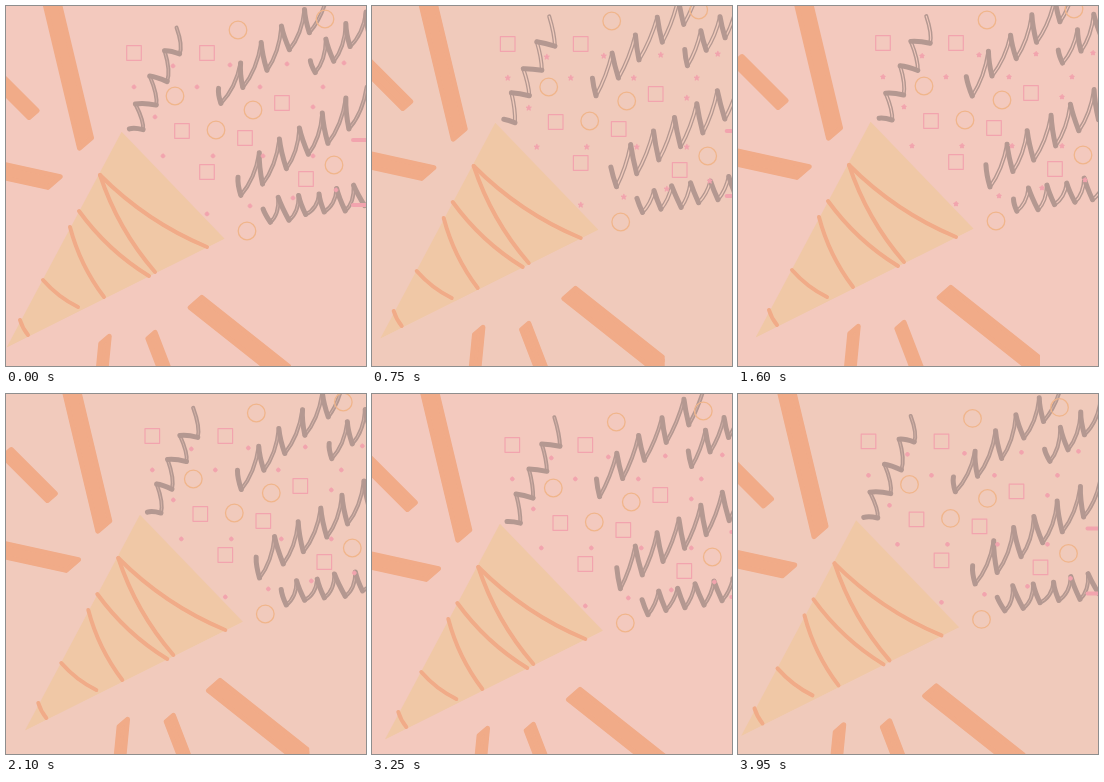
These frames come from a looping animation (360x360 px, 4000 ms). An HTML page with a canvas:

```html
<!DOCTYPE html>
<html lang="en">
<head>
<meta charset="utf-8">
<title>Party popper</title>
<style>
html, body { margin: 0; width: 100%; height: 100%; overflow: hidden; background: #f1c9bc; }
canvas { display: block; width: 360px; height: 360px; }
</style>
</head>
<body>
<canvas id="stage"></canvas>
<script>
const LOOP = 4000, STEP = 50, TAU = Math.PI * 2;
const RAY = '#f1ab88', CONE = '#f0c8a6', RING = '#f0b58b', PINK = '#f2a4ae', INK = '#b49891';

// Drift of the whole drawing: time, x, y.
const drift = [
  [0, 0, 0], [750, 7.7, -9], [1600, 17, -10], [2100, 18.3, -5],
  [2650, 13.7, 3], [3250, 12.3, 4], [3950, 2.5, 0.4]
];
// Outer end, inner end, thickness of the slanted nib.
const rays = [
  [42, -20, 79.5, 137, 1.13], [-17, 64, 27, 108, 0.76], [-25, 160, 48, 176, 1.17],
  [95, 375, 99, 334, 0.8], [163, 375, 145.5, 329.5, 0.68], [303, 386, 190, 296.5, 1.1]
];
const stripes = [
  [94, 169, 201, 241], [94, 169, 149, 266], [73, 205, 143, 270],
  [64, 221, 98, 291], [37, 274, 72, 301], [14, 314, 22, 329]
];
const rings = [[232, 24], [319, 13], [169, 90], [247, 104], [210, 124], [328, 159], [241, 225]];
const boxes = [[128, 47], [201, 47], [276, 97], [176, 125], [239, 132], [201, 166], [300, 173]];
// Rows of dots: start, step, count.
const dotRows = [
  [167, 60, 57, -1, 4], [128, 81, 63, 0, 4], [149, 111, 158, -10, 2],
  [157, 150, 50, 0, 4], [201, 208, 43, -8, 4]
];
// Zigzags: first crest, last crest, number of teeth, stroke from crest to trough.
const ribbons = [
  [118, 122, 170, 20, 4, 18, 3],
  [211, 74, 321, -16, 5, 5, 25],
  [303, 47, 377, -9, 4, 5, 21],
  [230, 161, 360, 80, 6, 6, 29],
  [255, 196, 368, 177, 6, 8, 20]
];

const canvas = document.getElementById('stage');
const ctx = canvas.getContext('2d');
const dpr = window.devicePixelRatio || 1;
canvas.width = canvas.height = 360 * dpr;
ctx.lineCap = ctx.lineJoin = 'round';

const mix = (a, b, u) => a + (b - a) * u;

function driftAt(t) {
  const n = drift.length;
  const key = i => {
    const [time, x, y] = drift[(i + n) % n];
    return [time + Math.floor(i / n) * LOOP, x, y];
  };
  let i = n - 1;
  while (drift[i][0] > t) i--;
  const p = key(i - 1), a = key(i), b = key(i + 1), q = key(i + 2);
  const span = b[0] - a[0], u = (t - a[0]) / span, v = 1 - u;
  return [1, 2].map(k => {
    const m = (b[k] - p[k]) / (b[0] - p[0]) * span;
    const w = (q[k] - a[k]) / (q[0] - a[0]) * span;
    return v * v * ((1 + 2 * u) * a[k] + u * m) + u * u * ((1 + 2 * v) * b[k] - v * w);
  });
}

function fillPath(pts, color, edge) {
  ctx.beginPath();
  for (const [x, y] of pts) ctx.lineTo(x, y);
  ctx.closePath();
  ctx.fillStyle = color;
  ctx.fill();
  if (edge) stroke(color, edge);
}

function stroke(color, width) {
  ctx.strokeStyle = color;
  ctx.lineWidth = width;
  ctx.stroke();
}

function drawCone() {
  fillPath([[115.6, 125.8], [218.6, 232.8], [0.6, 341.5]], CONE);
  for (const [x, y, ex, ey] of stripes) {
    const sag = 0.1, dx = ex - x, dy = ey - y;
    ctx.beginPath();
    ctx.moveTo(x, y);
    ctx.quadraticCurveTo(x + dx / 2 - dy * sag, y + dy / 2 + dx * sag, ex, ey);
    stroke(RAY, 4);
  }
}

function drawRays() {
  ctx.save();
  ctx.beginPath();
  ctx.rect(-50, -50, 335, 500);
  ctx.clip();
  for (const [x, y, ex, ey, size] of rays) {
    const w = 5.3 * size, h = 4.6 * size;
    fillPath([[x + w, y - h], [ex + w, ey - h], [ex - w, ey + h], [x - w, y + h]], RAY, 5);
  }
  ctx.restore();
}

function drawConfetti(star) {
  for (const [x, y] of rings) {
    ctx.beginPath();
    ctx.arc(x, y, 8.8, 0, TAU);
    stroke(RING, 1.3);
  }
  for (const [x, y] of boxes) {
    ctx.beginPath();
    ctx.rect(x - 7.3, y - 7.3, 14.6, 14.6);
    stroke(PINK, 1.2);
  }
  for (const [x, y, dx, dy, count] of dotRows) {
    for (let i = 0; i < count; i++) drawDot(x + dx * i, y + dy * i, star);
  }
  for (const y of [134, 199]) {
    ctx.beginPath();
    ctx.moveTo(347, y);
    ctx.lineTo(366, y);
    stroke(PINK, 4);
  }
}

// A round dot that sharpens into a five-pointed star.
function drawDot(x, y, star) {
  const pts = [];
  for (let k = 0; k < 10; k++) {
    const a = k * TAU / 10 - TAU / 4;
    const r = mix(1.9, k % 2 ? 1.2 : 2.9, star);
    pts.push([x + r * Math.cos(a), y + r * Math.sin(a)]);
  }
  fillPath(pts, PINK, 0.9);
}

function drawRibbon([x, y, ex, ey, teeth, dx, dy], row, phase, curl, slit, paper) {
  const pts = [];
  const add = (px, py) => {
    const n = row * 17 + pts.length, wave = phase * (1 + n % 3);
    const amp = 0.6 + curl;
    pts.push([px + amp * Math.sin(n * 2.4 + wave), py + amp * Math.sin(n * 4.1 - wave)]);
  };
  for (let k = 0; k < teeth; k++) {
    const cx = mix(x, ex, k / teeth), cy = mix(y, ey, k / teeth);
    const cut = k ? 0 : 0.3;
    add(cx + dx * cut, cy + dy * cut);
    add(cx + dx, cy + dy);
  }
  add(ex, ey);

  const bend = 2 + 3 * curl;
  const line = (i, color, width) => {
    const [ax, ay] = pts[i], [bx, by] = pts[i + 1];
    const side = i % 2 ? 1 : -0.4;
    ctx.beginPath();
    ctx.moveTo(ax, ay);
    ctx.quadraticCurveTo((ax + bx) / 2 + side * bend, (ay + by) / 2 + side * bend, bx, by);
    stroke(color, width);
  };
  // Rising strokes are folded ribbon with a pale slit; falling ones are solid.
  for (let i = 1; i < pts.length - 1; i += 2) {
    line(i, INK, 4);
    line(i, paper, slit);
  }
  for (let i = 0; i < pts.length - 1; i += 2) line(i, INK, 5);
}

function draw(t) {
  const phase = TAU * t / LOOP;
  const warm = 0.5 + 0.5 * Math.cos(TAU * t / 1630);
  const curl = 0.5 + 0.5 * Math.cos(2 * phase);
  const star = Math.max(0, Math.sin(phase));
  const paper = `rgb(${mix(240, 243, warm)},${mix(202, 201, warm)},${mix(187, 190, warm)})`;

  ctx.setTransform(dpr, 0, 0, dpr, 0, 0);
  ctx.fillStyle = paper;
  ctx.fillRect(0, 0, 360, 360);
  ctx.translate(...driftAt(t));
  drawCone();
  drawRays();
  ribbons.forEach((r, i) => drawRibbon(r, i, phase, curl, 0.5 + star, paper));
  drawConfetti(star);
}

const start = performance.now();
function tick() {
  const t = Math.max(0, performance.now() - start) % LOOP;
  draw(Math.floor(t / STEP) * STEP);
  requestAnimationFrame(tick);
}
tick();
</script>
</body>
</html>
```
